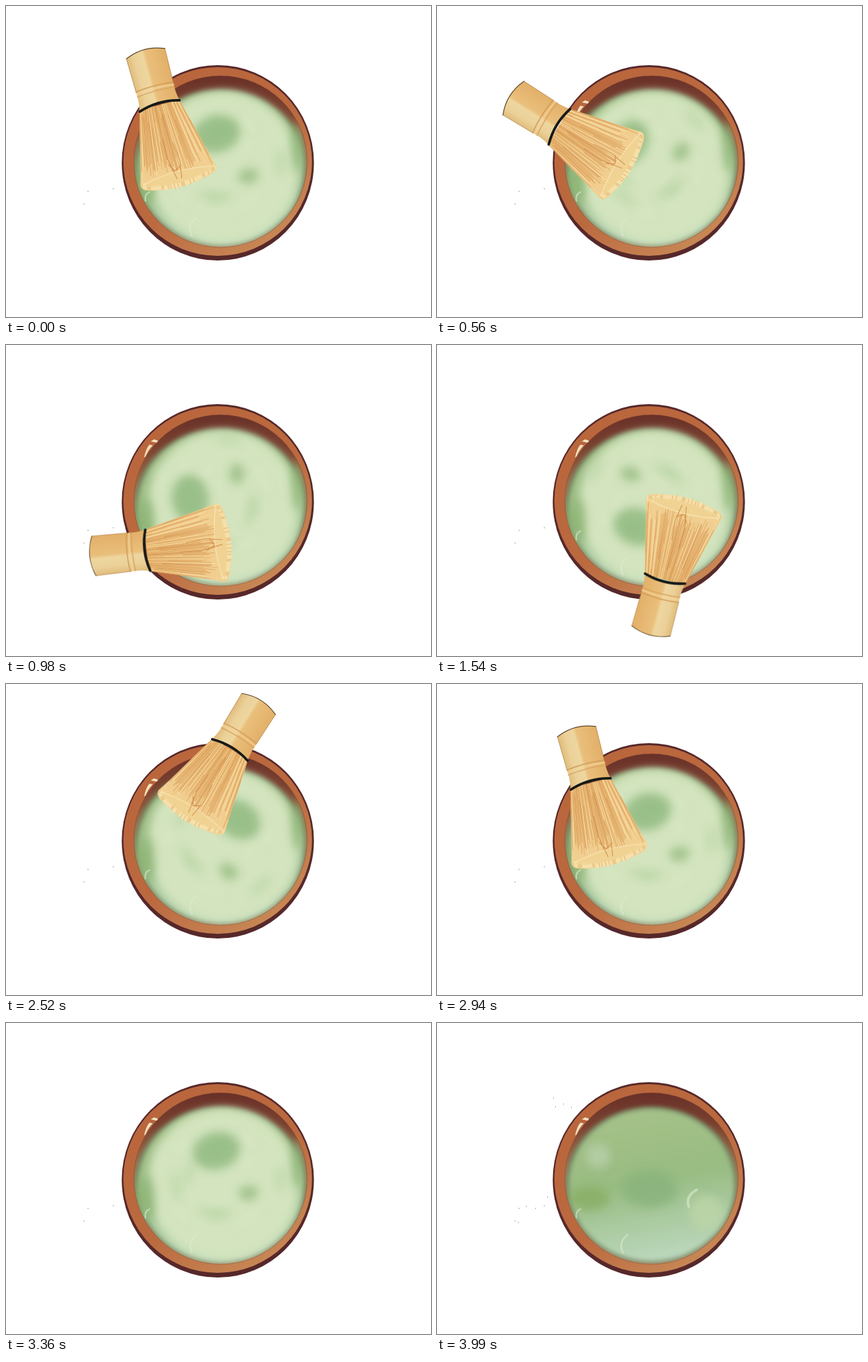
Recreate the animation shown at these times as an HTML page. Size 640x468 px, loop 4200 ms.

```html
<!DOCTYPE html>
<html lang="en">
<head>
<meta charset="utf-8">
<title>Whisking tea</title>
<style>
html, body { margin: 0; width: 100%; height: 100%; overflow: hidden; background: #fff; }
svg { display: block; width: 100vw; height: 100vh; }
</style>
</head>
<body>
<svg viewBox="0 0 640 468">
  <defs>
    <linearGradient id="rim" x1="0" y1="0" x2=".75" y2="1">
      <stop offset="0" stop-color="#b9653c"/><stop offset=".6" stop-color="#bb693f"/><stop offset="1" stop-color="#c98a57"/>
    </linearGradient>
    <linearGradient id="wall" x1="0" y1="0" x2="0" y2="1">
      <stop offset="0" stop-color="#652d27"/><stop offset=".2" stop-color="#79402f"/><stop offset=".5" stop-color="#b07a52"/><stop offset="1" stop-color="#c08e62"/>
    </linearGradient>
    <linearGradient id="tea" x1=".2" y1="0" x2=".4" y2="1">
      <stop offset="0" stop-color="#a6c289"/><stop offset=".5" stop-color="#98bc82"/><stop offset="1" stop-color="#bad7bb"/>
    </linearGradient>
    <linearGradient id="handle">
      <stop offset="0" stop-color="#dfba78"/><stop offset=".2" stop-color="#ebd098"/><stop offset=".42" stop-color="#eed6a0"/>
      <stop offset=".5" stop-color="#e9bf7b"/><stop offset="1" stop-color="#e2af68"/>
    </linearGradient>
    <linearGradient id="head" x1="0" y1="0" x2="0" y2="1">
      <stop offset="0" stop-color="#e8b974"/><stop offset="1" stop-color="#f3d497"/>
    </linearGradient>
    <filter id="soft" x="-80%" y="-80%" width="260%" height="260%"><feGaussianBlur stdDeviation="7"/></filter>
    <filter id="edge" x="-20%" y="-20%" width="140%" height="140%"><feGaussianBlur stdDeviation="3.5"/></filter>
    <clipPath id="inside"><ellipse cx="323" cy="234" rx="130.5" ry="129"/></clipPath>
  </defs>
  <rect width="640" height="468" fill="#fff"/>
  <path d="M123 279h1M161 275h1M117 298h1" stroke="#555"/>
  <path id="lateSpecks" d="M175 113h1M178 126h1M190 122h1M202 127h1M166 262h1M134 276h1M148 279h1M122 300h1" stroke="#555"/>
  <ellipse cx="319" cy="236" rx="144.7" ry="147" fill="#56282a"/>
  <ellipse cx="318.8" cy="234" rx="142" ry="142" fill="url(#rim)"/>
  <g clip-path="url(#inside)">
    <rect x="180" y="95" width="290" height="280" fill="url(#wall)"/>
    <ellipse cx="323" cy="244" rx="130" ry="118" fill="#71805e" filter="url(#edge)"/>
    <ellipse cx="323" cy="244" rx="125" ry="115" fill="url(#tea)" filter="url(#edge)"/>
    <g id="tones" filter="url(#soft)" opacity=".8">
      <circle cx="243" cy="200" r="18" fill="#b9d0ac"/>
      <ellipse cx="230" cy="264" rx="30" ry="18" fill="#88ad63"/>
      <ellipse cx="320" cy="250" rx="42" ry="28" fill="#88b27b"/>
      <circle cx="405" cy="285" r="26" fill="#bdd5a8"/>
    </g>
    <g id="foam">
      <ellipse cx="327" cy="243" rx="114" ry="115" fill="#d3e4be" filter="url(#soft)"/>
      <g id="swirl"></g>
      <g fill="#8eb578" opacity=".75" filter="url(#soft)">
        <ellipse cx="211" cy="265" rx="13" ry="36"/>
        <ellipse cx="439" cy="212" rx="9" ry="38"/>
      </g>
    </g>
    <g fill="none" stroke="#dcead0" stroke-width="2.5" opacity=".6" stroke-linecap="round">
      <path d="M210 293Q208 284 216 280M280 346Q272 330 287 319"/>
      <path id="lateBubble" d="M379 276Q374 260 391 251" stroke-width="4"/>
    </g>
  </g>
  <ellipse cx="323" cy="234" rx="130.5" ry="129" fill="none" stroke="#7d4430" stroke-opacity=".45"/>
  <path d="M208 169Q211 155 216 150L221 151Q214 158 210 168ZM218 145L223 142L229 144L227 147Z" fill="#f3e3c2"/>
  <g id="whisk"></g>
</svg>
<script>
const NS = 'http://www.w3.org/2000/svg';
const $ = id => document.getElementById(id);

function add(parent, tag, attrs) {
  const el = document.createElementNS(NS, tag);
  for (const k in attrs) el.setAttribute(k, attrs[k]);
  parent.appendChild(el);
  return el;
}

function seeded(s) {
  return () => (s = (s * 16807) % 2147483647) / 2147483647;
}

// One turn around the bowl: cord position and tilt of the whisk.
// Stops alternate between a long and a short hold.
const LONG = 560, SHORT = 420, FADE = 210, FADE_STEPS = 4;
const stops = [
  [231, 149, -15], [183, 181, -58], [212, 309, -96], [343, 353, -165],
  [453, 202, -259], [338, 98, -328], [231, 149, -375]
];
let stirTime = 0;
const poses = stops.map(([x, y, turn], i) => {
  const at = stirTime;
  stirTime += i === 0 || i === 2 || i === 4 ? LONG : SHORT;
  return { at, x, y, turn };
});
const LOOP = stirTime + FADE * FADE_STEPS;

// Gaps and streaks in the foam, around the bowl's centre; they turn with the whisk
function drawSwirl(g) {
  const rnd = seeded(12);
  const blob = (cx, cy, rx, ry, fill, opacity, angle = 0) =>
    add(g, 'ellipse', { cx, cy, rx, ry, fill, opacity, transform: `rotate(${angle})`, filter: 'url(#soft)' });
  for (let i = 0; i < 14; i++)
    blob(0, -45 - rnd() * 50, 14 + rnd() * 14, 6, i % 2 ? '#deebc9' : '#a5c993', .4, i * 137.5);
  blob(8, -42, 36, 28, '#8eb87e', .8);
  blob(38, 32, 15, 11, '#8eb578', .7);
}

// Upright whisk with its cord at the origin
function drawWhisk(g) {
  const rnd = seeded(41);
  const line = (d, stroke, width, opacity = 1) =>
    add(g, 'path', { d, stroke, 'stroke-width': width, opacity, fill: 'none', 'stroke-linecap': 'round' });

  add(g, 'path', { d: 'M-31 0C-42 40 -50 80 -59 110Q-59 117 -50 120Q0 134 50 120Q59 117 59 110C50 80 42 40 31 0Z', fill: 'url(#head)' });

  const tines = 60;
  const colors = ['#cf8d4b', '#e0a661', '#f8e0aa', '#dd9d58'];
  for (let i = 0; i <= tines; i++) {
    const t = i / tines * 2 - 1;
    const bow = 1 - t * t;
    const x = y => t * (31 + 26 * y / 112);
    const start = rnd() < .6 ? 0 : rnd() * 60;
    const end = 80 + rnd() * 26;
    const tip = 113 + 13 * bow + rnd() * 2;
    line(`M${x(start)} ${start}L${x(end)} ${end}`, colors[Math.floor(rnd() * 4)], .6 + rnd() * .6, .75);
    line(`M${t * 56} ${tip - 7}L${t * 57} ${tip}`, rnd() < .75 ? '#f7e5b3' : '#ebc484', 1.4);
  }
  add(g, 'path', { d: 'M-55 111Q0 98 55 111Q48 118 0 121Q-48 118 -55 111Z', fill: '#f1d494', opacity: .8 });
  line('M-55 110Q0 97 55 110', '#f8e6b6', 1.5, .8);
  line('M-8 50L-9 82L-3 114M5 60L8 90L4 115M-10 90L-3 102L8 96', '#cf8847', 1.2, .8);

  add(g, 'path', { d: 'M-30 -80Q0 -93 30 -80L29 -27Q28 -14 31 0Q0 -6 -31 0Q-28 -14 -29 -27Z', fill: 'url(#handle)' });
  line('M-30 -80Q0 -93 30 -80', '#5d4526', 1.2);
  line('M-30 -80L-29 -27M30 -80L29 -27', '#a87639', .8, .8);
  ['#d29a56', '#f3d59b', '#d9a45f'].forEach((color, i) => {
    const y = -28 + i * 4;
    line(`M-29 ${y}Q0 ${y - 4} 29 ${y}`, color, 1.4);
  });
  line('M-31 2Q0 -8 31 1', '#151a18', 3.8);
}

drawSwirl($('swirl'));
drawWhisk($('whisk'));

function render(ms) {
  const t = ms % LOOP;
  const pose = poses.filter(p => p.at <= t).pop();
  const fadeStep = Math.floor((t - stirTime) / FADE);
  const stirring = fadeStep < 0;
  const level = stirring ? 1 : 1 - fadeStep / (FADE_STEPS - 1);

  $('whisk').setAttribute('transform', `translate(${pose.x} ${pose.y}) rotate(${pose.turn})`);
  $('whisk').setAttribute('visibility', stirring ? 'visible' : 'hidden');
  $('swirl').setAttribute('transform', `translate(320 235) rotate(${pose.turn})`);
  $('foam').setAttribute('opacity', level);
  $('lateBubble').setAttribute('opacity', 1 - level);
  $('lateSpecks').setAttribute('visibility', fadeStep > 0 ? 'visible' : 'hidden');
}

const begin = performance.now();
function tick() {
  render(performance.now() - begin);
  requestAnimationFrame(tick);
}
tick();
</script>
</body>
</html>
```
